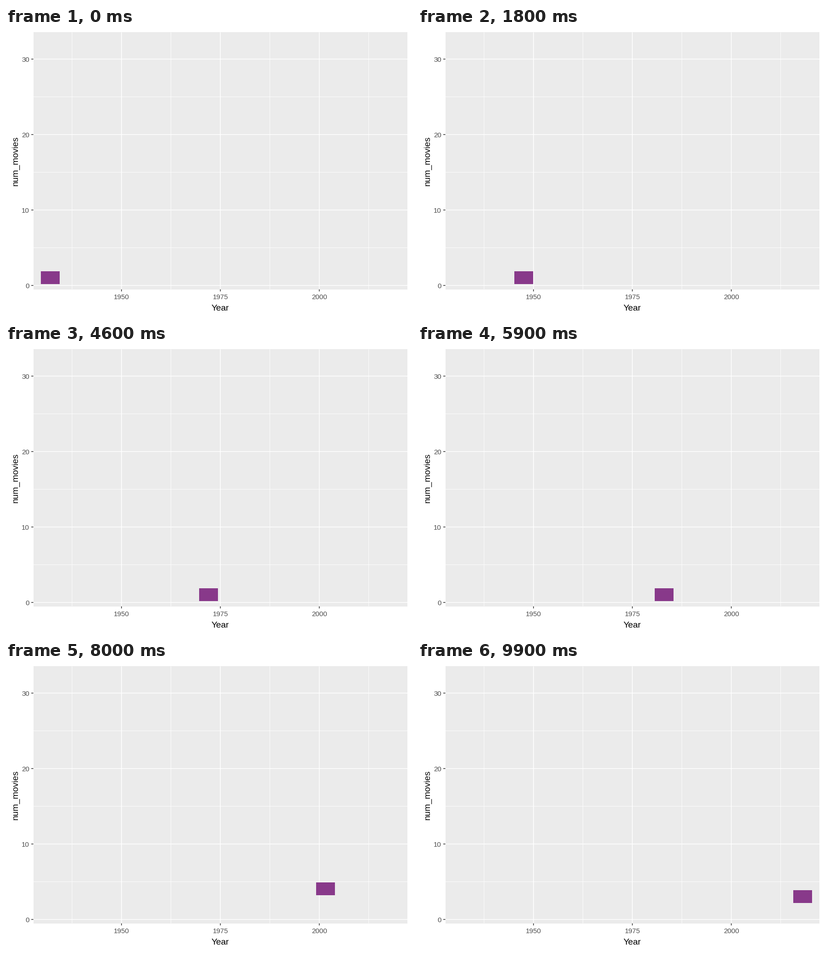
A matplotlib script that plays this animation: 885x632 px, repeating every 10 s.

```python
import numpy as np
import matplotlib.pyplot as plt
from matplotlib.animation import FuncAnimation
from matplotlib.patches import Rectangle

W, H, DPI = 885, 632, 100
FRAMES, STEP = 100, 100
LEFT, TOP, RIGHT, BOTTOM = 59.7, 9.4, 875, 571.5
GREY, DARK = "#4D4D4D", "#333333"


def movies(year):
    """A slow swell through the decades, then exponential growth."""
    swell = (1.05 + 0.065 * (year - 1955)) * np.sin(np.pi * (year - 1950) / 11) ** 2
    growth = 31 * np.exp((year - 2017) / 6.5)
    return np.floor(1 + np.maximum(swell, growth))


# a few scattered early years, then every year
years = np.r_[1932, 1946, 1949, 1951, 1955, 1958, 1962, 1966, 1970:2019]
counts = movies(years)
counts[-1] = 3  # the last year is incomplete
# each year is reached on the nearest whole frame
keys = np.round((years - years[0]) / (years[-1] - years[0]) * (FRAMES - 1))


def x_px(year):
    return 251.7 + 8.623 * (year - 1950)


def y_px(count):
    return 563 - 16.5 * count


def px(size):
    return size * 72 / DPI


fig = plt.figure(figsize=(W / DPI, H / DPI), dpi=DPI, facecolor="white")
ax = fig.add_axes([0, 0, 1, 1])
ax.set_xlim(0, W)
ax.set_ylim(H, 0)
ax.axis("off")


def line(x0, y0, x1, y1, color="white", width=1.5):
    ax.plot([x0, x1], [y0, y1], color=color, lw=px(width),
            solid_capstyle="butt", snap=False)


def label(x, y, text, size=15, color=GREY, **kw):
    ax.text(x, y, text, fontsize=px(size), family="Liberation Sans",
            color=color, va="baseline", rotation_mode="anchor",
            **{"ha": "center", **kw})


ax.add_patch(Rectangle((LEFT, TOP), RIGHT - LEFT, BOTTOM - TOP,
                       fc="#EBEBEB", ec="none", zorder=0))

for x in x_px(np.arange(1937.5, 2015, 25)):
    line(x, TOP, x, BOTTOM, width=0.9)
for y in y_px(np.arange(5, 30, 10)):
    line(LEFT, y, RIGHT, y, width=0.9)

for year in range(1950, 2001, 25):
    x = x_px(year)
    line(x, TOP, x, BOTTOM)
    line(x, BOTTOM, x, BOTTOM + 4.6, DARK)
    label(x, 593.3, year)
for count in range(0, 31, 10):
    y = y_px(count)
    line(LEFT, y, RIGHT, y)
    line(LEFT - 4.6, y, LEFT, y, DARK)
    label(51, y + 5.8, count, ha="right")

label(467.3, 618, "Year", 19.2, "black")
label(25.3, 290.5, "num_movies", 19.2, "black", rotation=90)

badge = Rectangle((0, 0), 41, 28, fc="#88398A", ec="none", zorder=3,
                  antialiased=False)
ax.add_patch(badge)


def update(i):
    year = np.interp(i, keys, years)
    count = np.interp(i, keys, counts)
    badge.set_xy((np.floor(76.8 + 8.625 * (year - years[0])),
                  np.floor(548.9 - 16.49 * count)))
    return (badge,)


anim = FuncAnimation(fig, update, frames=FRAMES, interval=STEP,
                     init_func=lambda: update(0), repeat=True, repeat_delay=0)
plt.show()
```
